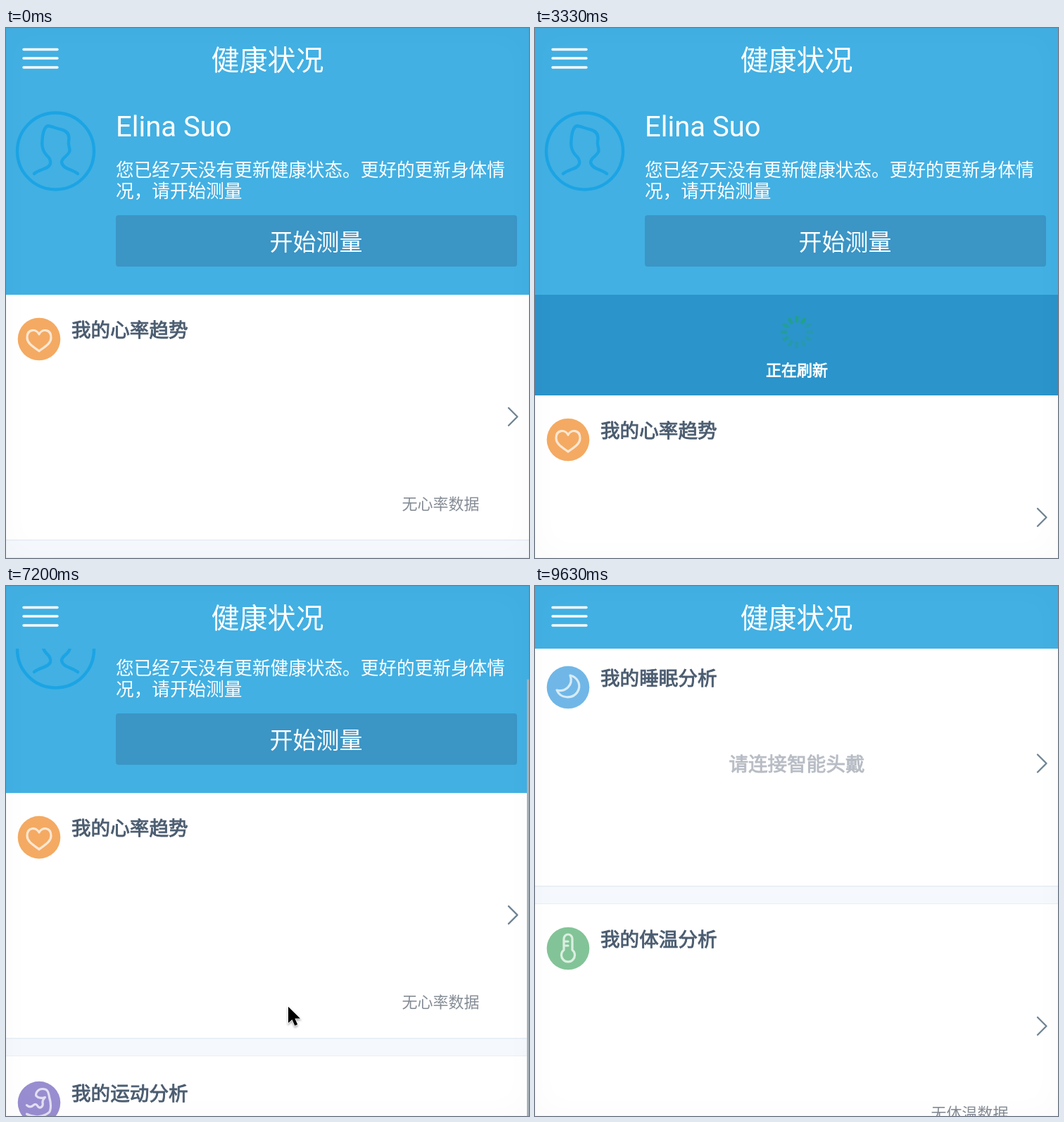
An HTML page for the animation above (9.66 s loop, 743 px wide and 753 px high).

```html
<!DOCTYPE html>
<html lang="zh-CN">
<head>
<meta charset="utf-8">
<title>健康状况</title>
<style>
  html, body { margin: 0; width: 100%; height: 100%; overflow: hidden; background: #fff; }
  svg { display: block; width: 100%; height: 100%; }
  text { font-family: Roboto, "Noto Sans CJK SC", "Noto Sans CJK", sans-serif; fill: #fff; }
  .line { fill: none; stroke-linecap: round; stroke-linejoin: round; }
  .title, .hint { font-size: 27.6px; stroke-width: .9px; }
  .title { fill: #4b5c70; stroke: #4b5c70; }
  .hint { fill: #b7bcc4; stroke: #b7bcc4; text-anchor: middle; }
  .empty { font-size: 22px; fill: #858c95; }
  .mid { text-anchor: middle; }
  #edge { position: fixed; inset: 0; box-shadow: inset 0 0 46px rgba(0,0,0,.022), inset 0 0 0 1px rgba(0,0,0,.025); }
</style>
</head>
<body>
<svg viewBox="0 0 743 753">
  <defs>
    <path id="arm" d="M-25 5C-20 10-15 9-10 4C-5 1-4 6-1 9C4 12 9 6 7 0C7-4 9-8 12-11C6-9-2-9-6-14C-8-22 0-28 7-28C16-28 19-24 21-10C25 2 24 16 20 20C10 28-8 32-25 23"/>
    <path id="heart" d="M0-7C-4-15-17-15-17-2C-17 6-8 11 0 17C8 11 17 6 17-2C17-15 4-15 0-7Z"/>
    <path id="moon" d="M3-17C15-14 19-2 13 7C6 17-11 16-16 4C-4 7 8-3 3-17Z"/>
    <path id="thermo" d="M-6 2V-14a6 6 0 0 1 12 0V2A9.5 9.5 0 1 1-6 2ZM-5-10H0M-5-4H0"/>
  </defs>
  <rect width="743" height="753" fill="#fff"/>
  <g id="scroller">
    <g id="list">
      <rect y="89" width="743" height="290" fill="#2b94ca"/>
      <use id="pullArm" href="#arm" x="372" y="288" class="line" stroke="#fff" stroke-width="3"/>
      <g id="spinner" transform="translate(372 289)"></g>
      <text id="status" class="mid" x="372" y="351" font-size="22" stroke="#fff" stroke-width=".8"></text>
      <g id="cards"></g>
    </g>
    <rect width="743" height="379" fill="#42b0e3"/>
    <g class="line" stroke="#1ca4e4" stroke-width="4.4">
      <circle cx="70.5" cy="175" r="54.5"/>
      <path d="M40 207C48 200 60 201 63 193C64 187 61 184 57 180C50 172 51 163 52 154C53 147 55 140 60 139C67 140 72 143 78 144C86 146 91 151 89 161C88 168 92 172 90 176C87 183 79 184 79 191C81 200 92 200 102 207"/>
    </g>
    <text x="156" y="154" font-size="40">Elina Suo</text>
    <g font-size="25.65">
      <text x="156" y="210.5">您已经7天没有更新健康状态。更好的更新身体情</text>
      <text x="156" y="240.5">况，请开始测量</text>
    </g>
    <rect x="156" y="266" width="570" height="73" rx="4" fill="#3b95c5"/>
    <text class="mid" x="440.5" y="315.5" font-size="33">开始测量</text>
  </g>
  <rect width="743" height="89" fill="#42b0e3"/>
  <path d="M25 30.5H73M25 43H73M25 56H73" class="line" stroke="#fff" stroke-width="3.4"/>
  <text class="mid" x="371.5" y="60" font-size="40">健康状况</text>
  <rect id="bar" x="740" width="3" height="700" fill="#aab3ba"/>
  <path id="cursor" d="M0 0V23L5.5 18.2L9.3 27L13.2 25.3L9.4 16.6H17Z" stroke="#fff" stroke-width="1.5" paint-order="stroke" style="filter:drop-shadow(0 2px 1.5px rgba(0,0,0,.35))"/>
</svg>
<div id="edge"></div>
<script>
const LOOP = 9660, PETALS = 12;
const CARD_TOP = 379, CARD_STEP = 374.3;
const PULL_MAX = 172, PULL_HOLD = 141, SCROLL_MAX = 1050;
const RELEASE = 2950;
const $ = id => document.getElementById(id);

const easeOut = power => u => 1 - (1 - u) ** power;
const swing = u => (1 - Math.cos(Math.PI * u)) / 2;
const ramp = (t, from, to, ease = swing) => ease(Math.min(1, Math.max(0, (t - from) / (to - from))));

const cards = [
  { title: '我的心率趋势', icon: 'heart', color: '#f4aa62', empty: '无心率数据' },
  { title: '我的运动分析', icon: 'arm', color: '#988dd0', scale: .7 },
  { title: '我的睡眠分析', icon: 'moon', color: '#70b7e7' },
  { title: '我的体温分析', icon: 'thermo', color: '#82c497', empty: '无体温数据' }
];

function cardMarkup({ title, icon, color, scale = 1, empty }, i) {
  const lift = empty ? 3 : 0;
  const y = Math.round(CARD_TOP + i * CARD_STEP);
  return `
  <g transform="translate(0 ${y})">
    <rect width="743" height="349" fill="#fff"/>
    <rect x="-2" y="348.5" width="747" height="25.5" fill="#f5f8fd" stroke="#e5ecf3" stroke-width="1.5"/>
    <circle cx="47" cy="${66 - lift}" r="30.3" fill="${color}"/>
    <use href="#${icon}" class="line" stroke="#fff" stroke-opacity=".72" stroke-width="${3.2 / scale}"
      transform="translate(47 ${66 - lift}) scale(${scale})"/>
    <text class="title" x="93" y="${63 - lift}">${title}</text>
    <path d="M714 161.5l12.5 12.5l-12.5 12.5" class="line" stroke="#6f8494" stroke-width="2.3"
      transform="translate(0 ${-lift / 4})"/>
    ${empty ? `<text class="empty" x="562.5" y="305">${empty}</text>`
            : '<text class="hint" x="372" y="184.5">请连接智能头戴</text>'}
  </g>`;
}
$('cards').innerHTML = cards.map(cardMarkup).join('');

$('spinner').innerHTML = Array.from({ length: PETALS }, (_, i) =>
  `<rect x="-2.3" y="-23" width="4.6" height="9.5" rx="1.5" fill="#1fa384" transform="rotate(${i * 360 / PETALS})"/>`).join('');
const petals = [...$('spinner').children];

// Drag down, settle while loading, then collapse
const pullAt = t =>
  PULL_MAX * ramp(t, 1050, 2726, easeOut(2))
  - (PULL_MAX - PULL_HOLD) * ramp(t, RELEASE, 3550, easeOut(3))
  - PULL_HOLD * ramp(t, 6180, 6610, easeOut(3));

const scrollAt = t => SCROLL_MAX * ramp(t, 6900, 8540);

// The pointer leads both drags and drifts up between them
function cursorAt(t) {
  const y = 780 - 360 * ramp(t, 450, 950)
    + 1.95 * pullAt(Math.min(t, RELEASE))
    - 47 * ramp(t, 3600, 4600) - 13 * ramp(t, 5300, 6300)
    - 1.15 * scrollAt(t);
  return [383 + t * .0025, y];
}

function draw(t) {
  const pull = pullAt(t), scroll = scrollAt(t), loading = t >= RELEASE;
  $('scroller').setAttribute('transform', `translate(0 ${-scroll})`);
  $('list').setAttribute('transform', `translate(0 ${Math.round(pull)})`);

  $('status').textContent = loading ? '正在刷新' : pull > PULL_HOLD ? '松开刷新' : '下拉刷新';
  $('pullArm').setAttribute('opacity', loading ? 0 : .28 * Math.min(1, pull / PULL_HOLD));
  $('spinner').setAttribute('opacity', loading ? 1 : 0);
  const lead = Math.floor(t / 100) + 4;
  petals.forEach((petal, i) => {
    const age = (lead - i + PETALS) % PETALS;
    petal.setAttribute('opacity', Math.max(.35, .95 - age * .08));
  });

  $('bar').setAttribute('y', 89 + scroll * .515);
  $('bar').setAttribute('opacity', ramp(t, 6950, 7050) - ramp(t, 9000, 9300));
  $('cursor').setAttribute('transform', `translate(${cursorAt(t)})`);
}

const start = performance.now();
function tick() {
  draw((performance.now() - start) % LOOP);
  requestAnimationFrame(tick);
}
tick();
</script>
</body>
</html>
```
